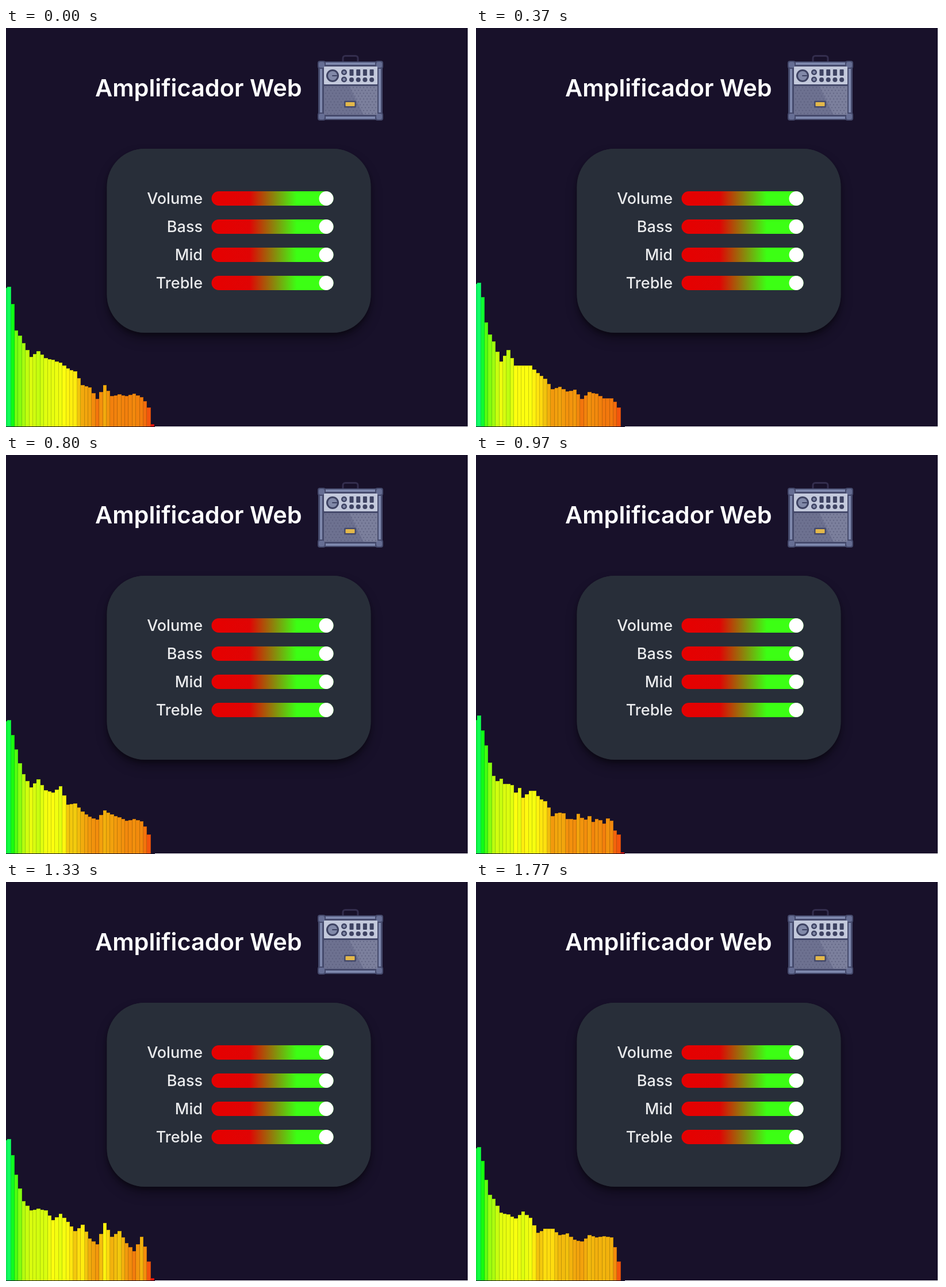
These frames come from a looping animation (807 by 694 pixels, 1810 ms). An HTML page with a canvas:

```html
<!DOCTYPE html>
<html lang="es">
<head>
<meta charset="utf-8">
<title>Amplificador Web</title>
<style>
html, body { margin: 0; width: 100%; height: 100%; overflow: hidden; background: #18112a; }
canvas { display: block; }
</style>
</head>
<body>
<canvas id="stage" width="807" height="694"></canvas>
<script>
const ctx = document.getElementById('stage').getContext('2d');
const W = 807, H = 694, LOOP = 1810, STEPS = 54;
const FLOOR = 693, PITCH = 6.4, BARS = 41;

// Key poses of the spectrum: bar tops at bars 1-5, then every second bar to 37.
const KEY_STEPS = [0, 4, 11, 24, 34, 40, 53];
const POSES = [
  [450, 480, 526, 535, 548, 572, 562, 574, 577, 582, 592, 597, 621, 625, 645, 621, 640, 637, 640, 636, 642],
  [456, 480, 504, 535, 553, 567, 573, 573, 588, 584, 595, 590, 606, 638, 637, 630, 631, 642, 634, 633, 641],
  [443, 468, 512, 533, 545, 580, 560, 587, 587, 587, 600, 610, 628, 624, 632, 629, 645, 633, 636, 644, 644],
  [461, 487, 512, 536, 555, 578, 564, 583, 587, 576, 608, 606, 620, 629, 634, 618, 625, 630, 636, 633, 637],
  [458, 476, 502, 531, 561, 559, 567, 577, 592, 587, 591, 611, 624, 616, 633, 638, 631, 628, 638, 647, 639],
  [447, 475, 509, 533, 555, 571, 568, 571, 588, 577, 591, 607, 596, 620, 630, 593, 617, 607, 628, 642, 617],
  [461, 485, 518, 544, 551, 575, 578, 585, 573, 584, 610, 603, 603, 614, 611, 622, 625, 614, 618, 616, 618]
];
const TAIL_POSES = [0, 4, 5];

const mix = (a, b, u) => a + (b - a) * u;

function noise(a, b) {
  const s = Math.sin(a * 127.1 + b * 311.7) * 43758.5453;
  return (s - Math.floor(s)) * 2 - 1;
}

function poseTop(p, bar) {
  const tops = POSES[p];
  if (bar === 0) return tops[0] + 2;
  if (bar <= 5) return tops[bar - 1];
  if (bar === 38) return mix(tops[20], 660, 0.4);
  if (bar === 39) return 660;
  if (bar === 40) return TAIL_POSES.includes(p) ? 689 : FLOOR;
  const k = 4 + (bar - 5) / 2, i = Math.floor(k);
  return i === k ? tops[i] : (tops[i] + tops[i + 1]) / 2;
}

function barTop(step, bar) {
  let p = KEY_STEPS.length - 1;
  while (KEY_STEPS[p] > step) p--;
  const q = (p + 1) % KEY_STEPS.length;
  const end = q ? KEY_STEPS[q] : STEPS;
  const u = (step - KEY_STEPS[p]) / (end - KEY_STEPS[p]);
  const top = mix(poseTop(p, bar), poseTop(q, bar), u);
  const sway = bar < 39 ? noise(step, bar) * 7 * Math.sin(Math.PI * u) : 0;
  return Math.round(top + sway);
}

function box(c, x, y, w, h, r, fill) {
  c.beginPath();
  c.roundRect(x, y, w, h, r);
  c.fillStyle = fill;
  c.fill();
}

function disc(c, x, y, r, fill) {
  c.beginPath();
  c.arc(x, y, r, 0, Math.PI * 2);
  c.fillStyle = fill;
  c.fill();
}

function drawAmp(c) {
  c.strokeStyle = '#332d4d';
  c.lineWidth = 3;
  c.beginPath();
  c.roundRect(586, 48.5, 26, 16, 4);
  c.stroke();

  box(c, 543, 58, 112, 102, 5, '#454a6c');
  box(c, 546, 60, 106, 98, 3, '#7e88ad');
  box(c, 550, 64, 98, 90, 2, '#454a6c');
  for (const x of [542, 642])
    for (const y of [57, 147]) {
      box(c, x, y, 14, 14, 4, '#454a6c');
      box(c, x + 2, y + 2, 10, 10, 3, '#666e94');
    }

  box(c, 553, 67, 93, 31, 1, '#c3c9dc');
  disc(c, 568, 83, 11, '#3e4363');
  disc(c, 568, 83, 8, '#8189a8');
  box(c, 567, 82, 9, 2, 1, '#3e4363');
  for (const y of [77, 89.5]) {
    disc(c, 588, y, 5, '#3e4363');
    disc(c, 588, y, 2.5, '#8189a8');
  }
  for (let i = 0; i < 4; i++) {
    const x = 601 + i * 11.7;
    box(c, x - 3.5, 72, 7, 11, 1, '#3e4363');
    disc(c, x, 90, 4, '#3e4363');
  }

  box(c, 553, 101, 93, 50, 1, '#6d7190');
  c.fillStyle = '#7b7f9c';
  c.beginPath();
  c.moveTo(597, 101);
  c.lineTo(646, 101);
  c.lineTo(646, 151);
  c.lineTo(622, 151);
  c.fill();
  for (let row = 0; row < 10; row++)
    for (let col = 0; col < 15; col++)
      disc(c, 556 + col * 6 + (row % 2) * 3, 103.5 + row * 5, 0.9, '#5a5e7e');
  box(c, 588, 126.5, 21, 12, 2, '#454a6c');
  box(c, 590.5, 129, 16, 7, 1, '#e3b84a');
}

function drawPanel(c) {
  c.save();
  c.shadowColor = 'rgba(0,0,0,.3)';
  c.shadowBlur = 20;
  c.shadowOffsetY = 12;
  box(c, 175.5, 210, 459, 320, 66, '#282e39');
  c.shadowBlur = 6;
  c.shadowOffsetY = 5;
  box(c, 175.5, 210, 459, 320, 66, '#282e39');
  c.restore();

  const fill = c.createLinearGradient(358, 0, 569, 0);
  fill.addColorStop(0, '#e60000');
  fill.addColorStop(0.31, '#e00404');
  fill.addColorStop(0.7, '#3cff14');
  fill.addColorStop(1, '#3cff14');
  c.font = '500 27px Poppins, Inter, sans-serif';
  c.textAlign = 'right';
  ['Volume', 'Bass', 'Mid', 'Treble'].forEach((name, i) => {
    const y = 296.5 + i * 49;
    c.fillStyle = '#e9eaec';
    c.fillText(name, 342, y + 9.5);
    box(c, 357.5, y - 12.5, 212, 25, 12.5, fill);
    disc(c, 557, y, 12.5, '#fff');
  });
}

function makeScene() {
  const layer = document.createElement('canvas');
  layer.width = W;
  layer.height = H;
  const c = layer.getContext('2d');
  c.fillStyle = '#18112a';
  c.fillRect(0, 0, W, H);
  c.fillStyle = '#fff';
  c.fillRect(803, 0, 4, H);
  c.fillRect(259, 693, 548, 1);
  c.font = '600 41.5px Poppins, Inter, sans-serif';
  c.fillText('Amplificador Web', 155, 118.5);
  drawAmp(c);
  drawPanel(c);
  return layer;
}

const scene = makeScene();

function drawBars(step) {
  for (let bar = 0; bar < BARS; bar++) {
    const top = barTop(step, bar), h = FLOOR - top;
    if (h < 2) continue;
    const x = Math.round(2.2 + (bar - 1) * PITCH);
    const w = Math.round(2.2 + bar * PITCH) - x;
    const hue = h * 0.57;
    ctx.fillStyle = `hsl(${hue}, ${hue > 50 ? 100 : 90}%, ${hue > 50 ? 53 : 50}%)`;
    ctx.fillRect(x, top, w, h);
    ctx.fillStyle = 'rgba(0,0,0,.2)';
    ctx.fillRect(x + w - 1, top, 1, h);
    ctx.fillRect(x, top, w - 1, 1);
  }
}

function stepAt(t) {
  let n = STEPS - 1;
  while (n > 0 && Math.round(n * 10 / 3) * 10 > t) n--;
  return n;
}

const start = performance.now();
function frame() {
  const t = Math.max(0, performance.now() - start) % LOOP;
  ctx.drawImage(scene, 0, 0);
  drawBars(stepAt(t));
  requestAnimationFrame(frame);
}
frame();
</script>
</body>
</html>
```
